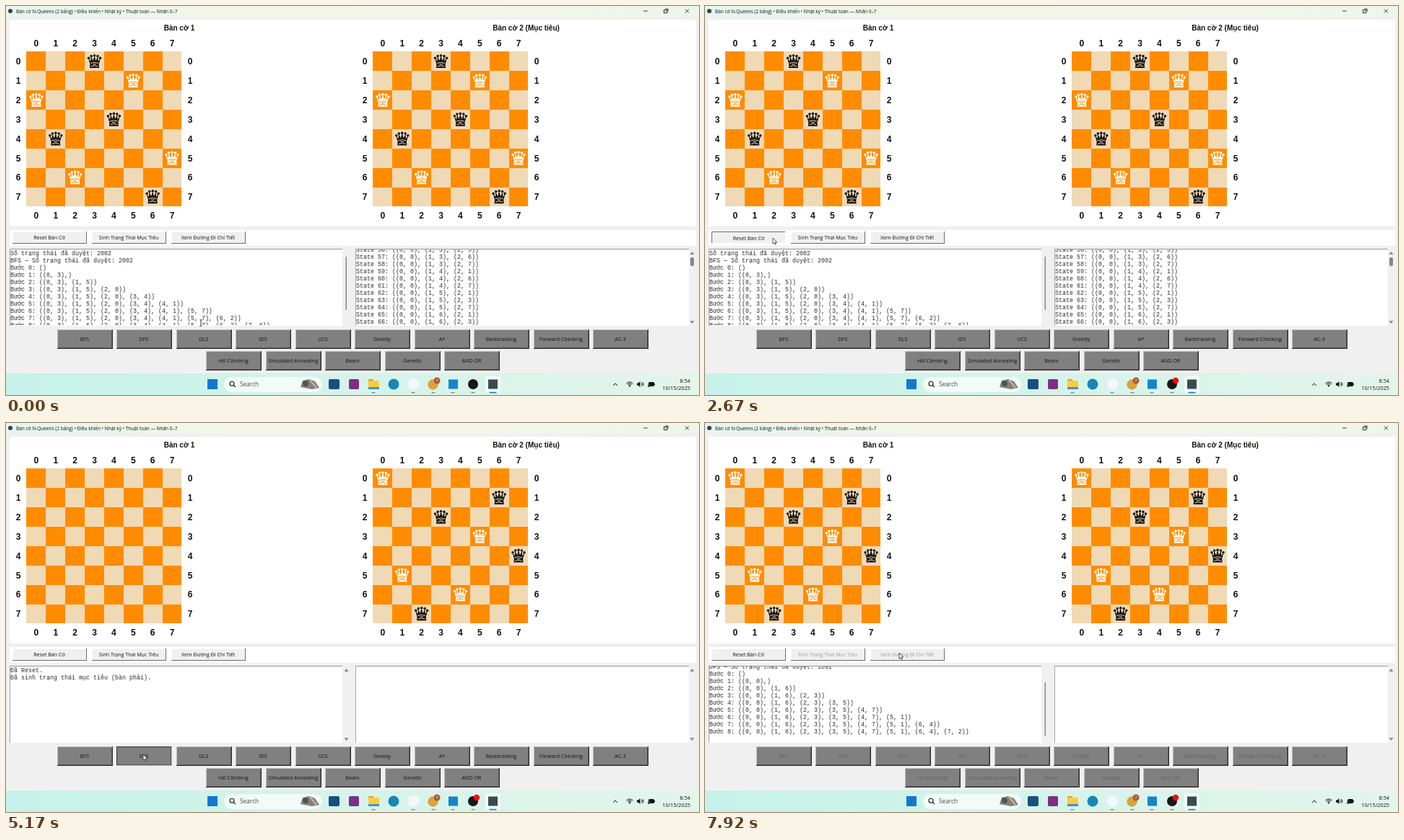
Recreate the animation shown at these times as an HTML page with a canvas. Size 960 px wide and 540 px high, loop 8000 ms.

```html
<!DOCTYPE html>
<html lang="vi">
<head>
<meta charset="utf-8">
<title>N-Queens</title>
<style>
html, body { margin: 0; width: 100%; height: 100%; overflow: hidden; background: #f0f0f0; }
canvas { display: block; width: 960px; height: 540px; }
</style>
</head>
<body>
<canvas id="stage" width="960" height="540"></canvas>
<script>
const ctx = document.getElementById('stage').getContext('2d');
const LOOP = 8000;
const UI = '"Open Sans", "Noto Sans", sans-serif';
const BOLD = '"Liberation Sans", Arial, sans-serif';
const MONO = '"Liberation Mono", monospace';
const GROUND = '#f0f0f0', PAPER = '#ffffff', GRAY = '#808080', INK = '#121212';
const DARK_CELL = '#ff8c00', LIGHT_CELL = '#f0d9b5';

// Column of the queen in each row
const FIRST = [3, 5, 0, 4, 1, 7, 2, 6];
const SECOND = [0, 6, 3, 5, 7, 1, 4, 2];

// Moments of the hard changes
const RECORD = 250, RESET = 2750, GOAL = 3920, SOLVE = 5250, PLACE = 5920, STEP = 250;

const PATH = [
  [0, 270, 440], [830, 206, 397], [1670, 111, 338], [2300, 94, 322],
  [2950, 94, 322], [3500, 184, 318], [4170, 184, 318], [4900, 190, 460],
  [5300, 190, 460], [5920, 213, 418], [6700, 226, 384], [7580, 269, 319], [8000, 269, 319]
];

function rect(x, y, w, h, color) {
  ctx.fillStyle = color;
  ctx.fillRect(x, y, w, h);
}

function disc(x, y, r, color) {
  ctx.fillStyle = color;
  ctx.beginPath();
  ctx.arc(x, y, r, 0, Math.PI * 2);
  ctx.fill();
}

function round(x, y, w, h, r, color) {
  ctx.fillStyle = color;
  ctx.beginPath();
  ctx.roundRect(x, y, w, h, r);
  ctx.fill();
}

function line(points, color, width = 1) {
  ctx.strokeStyle = color;
  ctx.lineWidth = width;
  ctx.beginPath();
  points.forEach(([x, y]) => ctx.lineTo(x, y));
  ctx.stroke();
}

function poly(points, color) {
  ctx.fillStyle = color;
  ctx.beginPath();
  points.forEach(([x, y]) => ctx.lineTo(x, y));
  ctx.closePath();
  ctx.fill();
}

function text(str, x, y, font, color = INK, align = 'left') {
  ctx.font = font;
  ctx.fillStyle = color;
  ctx.textAlign = align;
  ctx.textBaseline = 'alphabetic';
  ctx.fillText(str, x, y);
}

function sweep(...colors) {
  const fill = ctx.createLinearGradient(0, 0, 960, 0);
  colors.forEach((c, i) => fill.addColorStop(i / (colors.length - 1), c));
  return fill;
}

function clip(x, y, w, h, paint) {
  ctx.save();
  ctx.beginPath();
  ctx.rect(x, y, w, h);
  ctx.clip();
  paint();
  ctx.restore();
}

function queen(x, y, color, back) {
  ctx.save();
  ctx.translate(x, y);
  const tips = [[-8, -4.6], [-4.4, -7.4], [0, -8.2], [4.4, -7.4], [8, -4.6]];
  tips.forEach(([a, b]) => disc(a, b, 1.75, color));
  poly([[-8.4, -4.4], [-5, 0], [-4.9, -7], [-1.9, -0.8], [0, -8], [1.9, -0.8],
    [4.9, -7], [5, 0], [8.4, -4.4], [6.1, 4.2], [6.5, 9.2], [-6.5, 9.2], [-6.1, 4.2]], color);
  const arc = (top, rise, half) => {
    ctx.strokeStyle = back;
    ctx.lineWidth = 1;
    ctx.beginPath();
    ctx.moveTo(-half, top);
    ctx.quadraticCurveTo(0, top - rise, half, top);
    ctx.stroke();
  };
  arc(2.6, 2.6, 5.6);
  arc(7.1, 2.4, 4.8);
  line([[-2.4, 4], [2.4, 4]], back, 1);
  ctx.restore();
}

function board(x0, title, titleX, columns, count) {
  const cell = 26.875, y0 = 63.4, font = 'bold 12px ' + BOLD;
  text(title, titleX, 34.3, 'bold 10px ' + BOLD, INK, 'center');
  for (let i = 0; i < 8; i++) {
    const mid = (i + 0.5) * cell;
    text(i, x0 + mid, 56.2, font, INK, 'center');
    text(i, x0 + mid, 294.6, font, INK, 'center');
    text(i, x0 - 11.4, y0 + mid + 4.3, font, INK, 'center');
    text(i, x0 + 226.6, y0 + mid + 4.3, font, INK, 'center');
    for (let j = 0; j < 8; j++) {
      const left = Math.round(x0 + j * cell), top = Math.round(y0 + i * cell);
      rect(left, top, Math.round(x0 + (j + 1) * cell) - left,
        Math.round(y0 + (i + 1) * cell) - top, (i + j) % 2 ? LIGHT_CELL : DARK_CELL);
    }
  }
  columns.slice(0, count).forEach((col, row) => {
    const dark = (row + col) % 2;
    queen(x0 + (col + 0.5) * cell, y0 + (row + 0.5) * cell,
      dark ? '#101010' : '#fffdf8', dark ? LIGHT_CELL : DARK_CELL);
  });
}

function bevel(x, y, w, h, face, light, dark, sunken) {
  rect(x, y, w, h, sunken ? light : dark);
  rect(x, y, w - 1, h - 1, sunken ? dark : light);
  rect(x + 1, y + 1, w - 2, h - 2, face);
}

function toolButton(x, label, enabled, sunken) {
  bevel(x, 313, 103, 17, GROUND, '#fdfdfd', '#6c6c6c', sunken);
  const shift = sunken ? 0.5 : 0;
  text(label, x + 51 + shift, 324 + shift, '7.1px ' + UI, enabled ? INK : '#9d9d9d', 'center');
}

function algButton(x, y, label, enabled, sunken) {
  bevel(x, y, 77, 27, GRAY, '#bdbdbd', '#303030', sunken);
  rect(x + 1, y + 25, 75, 1, '#565656');
  rect(x + 75, y + 1, 1, 25, '#565656');
  text(label, x + 38, y + 15.7, '7.2px ' + UI, enabled ? INK : '#626262', 'center');
}

function pairs(columns, n) {
  const list = columns.slice(0, n).map((c, r) => `(${r}, ${c})`);
  return n ? `(${list.join(', ')}${n === 1 ? ',' : ''})` : '()';
}

function steps(columns) {
  return Array.from({ length: 9 }, (_, n) => `Bước ${n}: ${pairs(columns, n)}`);
}

// Third-level states that begin with a queen at (0, 0)
function stateLines() {
  const out = [];
  for (let a = 3, n = 55; a < 7; a++) {
    for (let b = 1; b < 8; b++) {
      if (b === 2 || Math.abs(a - b) < 2) continue;
      out.push(`State ${n++}: ((0, 0), (1, ${a}), (2, ${b}))`);
    }
  }
  return out.slice(1, 12);
}

function log(x, y, lines) {
  lines.forEach((s, i) => text(s, x, y + i * 10, '8.34px ' + MONO, '#2c2c2c'));
}

function pane(x, w, lines, y) {
  rect(x, 337, w, 107, PAPER);
  rect(x, 337, w, 1, '#989898');
  rect(x, 337, 1, 107, '#a6a6a6');
  clip(x + 1, 338, w - 1, 105, () => log(x + 1, y, lines));
}

function arrows(x) {
  poly([[x - 3, 345], [x, 341], [x + 3, 345]], '#8a8a8a');
  poly([[x - 3, 437], [x, 441], [x + 3, 437]], '#8a8a8a');
}

function logs(t) {
  const count = n => 'Số trạng thái đã duyệt: ' + n;
  let lines, y = 346;
  if (t < RESET) {
    lines = [count(2002), 'BFS — ' + count(2002), ...steps(FIRST)];
  } else if (t < SOLVE) {
    lines = ['Đã Reset.'];
    if (t >= GOAL) lines.push('Đã sinh trạng thái mục tiêu (bàn phải).');
  } else {
    lines = ['DFS — ' + count(1892), ...steps(SECOND)];
    y = 341;
  }
  pane(5, 461, lines, y);
  if (t < RESET) rect(470.5, 348, 1.5, 74, '#858585');
  else if (t >= SOLVE) rect(470.5, 360, 1.5, 74, '#858585');
  else arrows(471.5);

  pane(484, 462, t < RESET ? stateLines() : [], 341);
  arrows(950.5);
  if (t < RESET) round(948, 349, 5, 12, 2, '#858585');
}

function titleBar() {
  rect(0, 0, 960, 15, sweep('#e4f6ee', '#f3f6e6', '#f3f6e8', '#ecf6ea'));
  disc(6, 7, 3, '#35404a');
  text('Bàn cờ N-Queens (2 bảng) • Điều khiển • Nhật ký • Thuật toán — Nhãn 0–7',
    14, 9.6, '6.5px ' + UI);
  line([[883, 7], [889, 7]], INK, 0.8);
  ctx.strokeStyle = INK;
  ctx.lineWidth = 0.8;
  ctx.strokeRect(911.5, 5.5, 4.2, 4.2);
  line([[913, 4], [917.2, 4], [917.2, 8.2]], INK, 0.8);
  line([[941, 4.5], [946, 9.5]], INK, 0.8);
  line([[946, 4.5], [941, 9.5]], INK, 0.8);
}

function tray() {
  line([[841, 527], [844, 524], [847, 527]], INK, 1);
  ctx.strokeStyle = INK;
  ctx.lineWidth = 1;
  [2, 4, 6].forEach(r => {
    ctx.beginPath();
    ctx.arc(864, 528, r, -Math.PI * 0.78, -Math.PI * 0.22);
    ctx.stroke();
  });
  disc(864, 527.5, 1, INK);
  poly([[874, 523.5], [876, 523.5], [878.5, 521], [878.5, 529], [876, 526.8], [874, 526.8]], INK);
  [2.2, 4].forEach(r => {
    ctx.beginPath();
    ctx.arc(878.8, 525, r, -0.8, 0.8);
    ctx.stroke();
  });
  round(890, 522, 8, 6, 1.5, INK);
  rect(898, 524, 1, 2, INK);
  disc(891, 527, 2, '#2c4030');
  text('8:54', 948, 522.5, '7.3px ' + UI, INK, 'right');
  text('10/15/2025', 948, 532.6, '7.3px ' + UI, INK, 'right');
}

function taskbar(t) {
  rect(0, 510, 960, 30, sweep('#c6f1ea', '#cdf3e8', '#d5f3ea', '#dcf4ea', '#e4f5ea'));
  rect(279, 518, 14, 14, '#1478cf');

  round(302, 515, 136, 21, 10.5, '#f2fbf8');
  ctx.strokeStyle = INK;
  ctx.lineWidth = 1.1;
  ctx.beginPath();
  ctx.arc(313, 524.2, 3, 0, 7);
  ctx.stroke();
  line([[315.2, 526.4], [318, 529.2]], INK, 1.2);
  text('Search', 324, 528.4, '8.3px ' + UI, '#4a4a4a');
  poly([[408, 529], [411, 520], [420, 518], [428, 521], [434, 530], [424, 532]], '#85807a');
  disc(415, 524, 4, '#4c5657');
  line([[421, 519], [430, 530]], '#c2b8a4', 2);

  round(664, 514, 21, 23, 3, '#f0faf6');
  round(447, 518, 15, 14, 2, '#174f80');
  round(475, 518, 14, 14, 2, '#7c2f83');
  round(502, 518, 7, 5, 1, '#e0a318');
  round(502, 520, 15, 12, 1.5, '#ffcb3c');
  rect(502, 529, 15, 3, '#3f91d2');
  disc(537, 525, 7.5, '#1788b5');
  disc(564.5, 525, 8, '#f1f7fc');
  disc(591.5, 525.5, 7.2, '#d8a53a');
  disc(597, 520, 4.5, '#a75a35');
  text('7', 597, 522.2, '6px ' + UI, '#fff', 'center');
  rect(613, 518.5, 13, 13, '#1684cb');
  disc(647, 525, 7, '#17181c');
  if (t >= RECORD) disc(652, 520, 4.2, '#f30b12');
  rect(668, 518.5, 13, 13, '#394b4c');
  [509, 564, 592, 619, 647].forEach(x => rect(x - 2.5, 536, 5, 1.4, '#808a88'));
  rect(669.5, 535.8, 10, 1.6, '#1478cf');
  tray();
}

function buttons(t) {
  const idle = t < SOLVE;
  toolButton(9, 'Reset Bàn Cờ', true, t >= 2580 && t < RESET);
  toolButton(119, 'Sinh Trạng Thái Mục Tiêu', idle, t >= 3750 && t < GOAL);
  toolButton(229, 'Xem Đường Đi Chi Tiết', idle, false);
  ['BFS', 'DFS', 'DLS', 'IDS', 'UCS', 'Greedy', 'A*', 'Backtracking', 'Forward Checking', 'AC-3']
    .forEach((s, i) => algButton(Math.round(70.5 + i * 82.55), 449, s, idle, i === 1 && t >= 5120 && idle));
  ['Hill Climbing', 'Simulated Annealing', 'Beam', 'Genetic', 'AND OR']
    .forEach((s, i) => algButton(Math.round(277 + i * 82.55), 479, s, idle, false));
}

function pointer(t) {
  const i = PATH.findIndex(p => p[0] > t);
  const [t0, x0, y0] = PATH[i - 1], [t1, x1, y1] = PATH[i];
  const k = (t - t0) / (t1 - t0), u = k * k * (3 - 2 * k);
  const y = y0 + (y1 - y0) * u;
  ctx.save();
  ctx.translate(x0 + (x1 - x0) * u, y);
  if (y >= 337 && y < 444) {
    line([[0, -4], [0, 4]], '#222', 0.9);
    line([[-1.7, -4.2], [1.7, -4.2]], '#222', 0.8);
    line([[-1.7, 4.2], [1.7, 4.2]], '#222', 0.8);
  } else {
    const shape = [[0, 0], [0, 8.2], [1.9, 6.5], [3.2, 9.2], [4.4, 8.6], [3.2, 6], [5.7, 6]];
    poly(shape, '#fff');
    line([...shape, [0, 0]], '#111', 0.7);
    if (t > 3850 && t < 4170) {
      ctx.strokeStyle = '#4b78a8';
      ctx.lineWidth = 1.2;
      ctx.beginPath();
      ctx.arc(4, 3, 2.2, 0, 7);
      ctx.stroke();
    }
  }
  ctx.restore();
}

function draw(t) {
  rect(0, 0, 960, 540, GROUND);
  titleBar();
  rect(5, 19, 951, 287, PAPER);
  rect(5, 311, 951, 22, PAPER);
  const placed = Math.max(0, Math.min(8, Math.floor((t - PLACE) / STEP) + 1));
  const old = t < RESET, columns = old ? FIRST : SECOND;
  board(28.45, 'Bàn cờ 1', 240, columns, old ? 8 : placed);
  board(508.45, 'Bàn cờ 2 (Mục tiêu)', 720.5, columns, old || t >= GOAL ? 8 : 0);
  logs(t);
  buttons(t);
  taskbar(t);
  pointer(t);
}

const start = performance.now();
function tick() {
  draw((performance.now() - start) % LOOP);
  requestAnimationFrame(tick);
}
tick();
</script>
</body>
</html>
```
